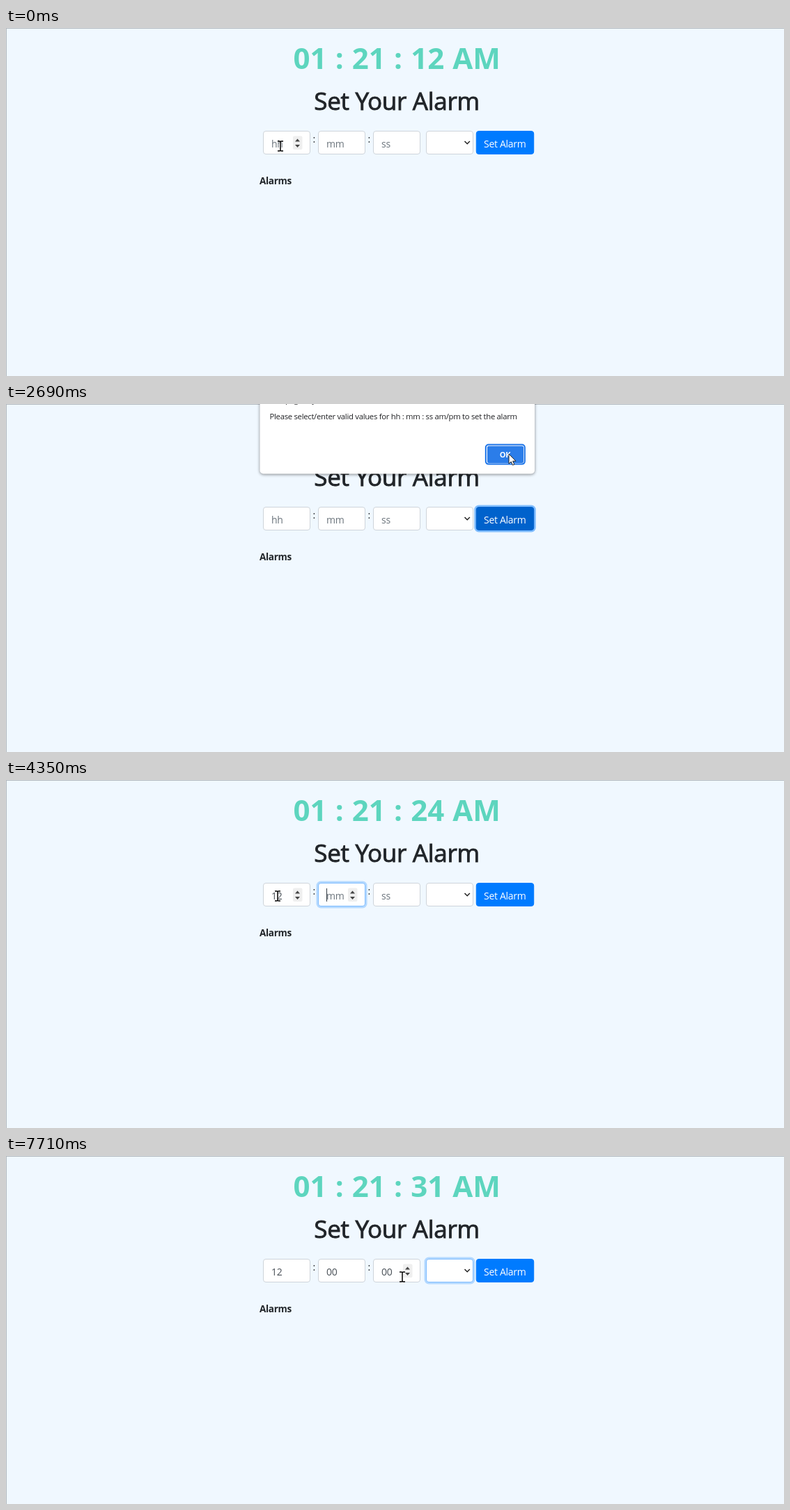
An HTML page for the animation above (8 s loop, 1117 by 501 pixels).

```html
<!DOCTYPE html>
<html lang="en">
<head>
<meta charset="utf-8">
<title>Alarm clock</title>
<style>
  html, body { margin: 0; width: 100%; height: 100%; overflow: hidden; background: #f0f8ff; }
  svg { display: block; font: 14px "Open Sans", "Noto Sans", sans-serif; letter-spacing: -.02em; }
  .clock { font-size: 42px; font-weight: 700; fill: #5dd5be; letter-spacing: 0; word-spacing: 1.3px; }
  .title { font-size: 35px; fill: #212529; stroke: #212529; stroke-width: .9px; }
  .bold { font-size: 13.5px; font-weight: 700; fill: #212529; }
  .message { font-size: 11.3px; fill: #202124; }
  .ok { font-size: 11px; font-weight: 700; fill: #fff; }
  .mid { text-anchor: middle; }
  .dialog { filter: drop-shadow(0 1px 2px #0007); }
</style>
</head>
<body>
<svg id="stage" width="1117" height="501" viewBox="0 0 1117 501"></svg>
<script>
const LOOP = 8000;
const FIELDS = [[369.5, 'hh'], [448.5, 'mm'], [527.5, 'ss']];
const SELECT = 3, BUTTON = 4;

// Each step changes only the listed parts of the state.
const STEPS = [
  [0, { clock: 12, cursor: ['beam', 394, 170], values: ['', '', ''], rings: {}, caret: 0, dialog: '' }],
  [340, { clock: 13, cursor: ['hand', 703, 165], rings: { [BUTTON]: .5 } }],
  [670, { dialog: 'open', rings: { [BUTTON]: 1 } }],
  [1000, { cursor: ['beam', 599.5, 13] }],
  [1330, { cursor: ['beam', 494.5, 9] }],
  [1670, { cursor: ['beam', 646.5, 14] }],
  [2010, { cursor: ['beam', 687, 21] }],
  [2340, { cursor: ['arrow', 741, 82] }],
  [2690, { cursor: ['arrow', 722, 72], dialog: 'hover' }],
  [3030, { clock: 21, dialog: 'closing' }],
  [3360, { dialog: '', rings: { 0: 1 }, caret: 1, cursor: ['beam', 390, 167] }],
  [3690, { clock: 22, values: ['12', '', ''] }],
  [4350, { clock: 24, rings: { 1: 1 } }],
  [4690, { caret: 0 }],
  [5020, { cursor: ['arrow', 424, 140] }],
  [5350, { clock: 28, values: ['12', '00', ''], rings: { 2: 1 }, caret: 1, cursor: ['arrow', 501, 227] }],
  [6020, { caret: 0, cursor: ['arrow', 442, 197] }],
  [6370, { clock: 30, values: ['12', '00', '6'], caret: 1, cursor: ['beam', 569, 174] }],
  [6710, { values: ['12', '00', '60'] }],
  [7040, { clock: 31 }],
  [7390, { values: ['12', '00', '00'], rings: { 2: .4, [SELECT]: .6 }, caret: 0 }],
  [7710, { rings: { [SELECT]: 1 } }],
];

const CURSORS = {
  beam: `<path d="M-4-7h3l1 1 1-1h3M-4 7h3l1-1 1 1h3M0-6V6" fill="none" stroke="#fff" stroke-width="3" opacity=".6"/>
    <path d="M-4-7h3l1 1 1-1h3M-4 7h3l1-1 1 1h3M0-6V6" fill="none" stroke="#000" stroke-width="1.5"/>`,
  arrow: '<path d="M0 0V14L3.2 11 5.4 16 7.8 15 5.6 10.2H10Z" fill="#fff" stroke="#222"/>',
  hand: '<path d="M4 10V1.5Q5-.5 6 1.5V7Q8 5.5 8.5 7.5 10 6 10.5 8 12 7 12 9V13L10.5 17H5L.5 11.5Q1 9 4 12Z" fill="#fff" stroke="#222"/>',
};

const text = (x, y, content, cls = '', fill = '') =>
  `<text x="${x}" y="${y}" class="${cls}" ${fill && `fill="${fill}"`}>${content}</text>`;

const rect = (x, y, w, h, r, attrs) =>
  `<rect x="${x}" y="${y}" width="${w}" height="${h}" rx="${r}" ${attrs}/>`;

function control(x, w, ring = 0, fill = '#fff', border = ring ? '#80bdff' : '#ced4da', glow = '#b4d9ff') {
  const grow = 3 * ring;
  return (ring ? rect(x - grow, 148.5 - grow, w + 2 * grow, 33 + 2 * grow, 3.5 + grow, `fill="${glow}"`) : '') +
    rect(x, 148.5, w, 33, 3.5, `fill="${fill}" stroke="${border}"`);
}

function field(i, { values, rings, caret, cursor: [kind, cx, cy] }) {
  const [x, hint] = FIELDS[i], value = values[i];
  const hovered = kind === 'beam' && cx > x && cx < x + 67 && cy > 148;
  let out = control(x, 67, rings[i]);
  out += text(x + 11.5, 171.5, value || hint, '', value ? '#495057' : '#6c757d');
  if (hovered || rings[i] === 1) {
    out += rect(x + 42.5, 155.5, 13.5, 19.5, 2, 'fill="#efefef"') +
      `<path d="M${x + 45.5} 163.5l3.5-4 3.5 4zm0 4.5h7l-3.5 4z" fill="#444"/>`;
  }
  if (caret && rings[i] === 1) out += rect(x + 11.5 + value.length * 7.7, 156, 1, 19, 0, 'fill="#333b42"');
  return out;
}

function dialog(mode) {
  if (!mode) return '';
  const closing = mode === 'closing';
  const button = closing
    ? rect(689, 58.5, 57, 28.5, 4, 'fill="#1f78ea"')
    : rect(688.8, 58.6, 56, 28, 4, 'fill="#fff" stroke="#1a73e8" stroke-width="2"') +
      rect(691, 60.5, 52, 24.5, 2, `fill="${mode === 'hover' ? '#2b7de9' : '#1a73e8'}"`);
  return `<g ${closing ? 'transform="translate(0 -3.7)" opacity=".97"' : ''}>` +
    rect(364.5, -10, 394.5, 110.5, 5, 'fill="#fff" class="dialog"') +
    text(378, -2, 'This page says', 'message') +
    text(378.5, 22, 'Please select/enter valid values for hh : mm : ss am/pm to set the alarm', 'message') +
    button + text(716.5, 76.5, 'OK', 'ok mid') + '</g>';
}

function draw(state) {
  const { clock, cursor: [kind, cx, cy], rings } = state;
  const buttonFill = rings[BUTTON] ? '#0062cc' : '#007bff';
  stage.innerHTML =
    '<path d="M0 .5H1117M.5 0V501" stroke="#b4bac0"/>' +
    text(412.5, 59, `01 : 21 : ${clock} AM`, 'clock') +
    text(561, 118, 'Set Your Alarm', 'title mid') +
    FIELDS.map((_, i) => field(i, state)).join('') +
    text(440.5, 165, ':', '', '#212529') + text(519.5, 165, ':', '', '#212529') +
    control(603.5, 67, rings[SELECT]) +
    '<path d="M658.5 163l3.7 3.7 3.7-3.7" fill="none" stroke="#222" stroke-width="1.5"/>' +
    control(675.3, 82.4, rings[BUTTON], buttonFill, buttonFill, '#80bdff') +
    text(716.3, 171.5, 'Set Alarm', 'mid', '#fff') +
    text(364, 225, 'Alarms', 'bold') +
    dialog(state.dialog) +
    `<g transform="translate(${cx} ${cy})">${CURSORS[kind]}</g>`;
}

const stage = document.getElementById('stage');
let shown = -1;

function tick() {
  const t = performance.now() % LOOP;
  const current = STEPS.filter(([at]) => at <= t);
  if (current.length !== shown) {
    shown = current.length;
    draw(Object.assign({}, ...current.map(([, change]) => change)));
  }
  requestAnimationFrame(tick);
}
tick();
</script>
</body>
</html>
```
